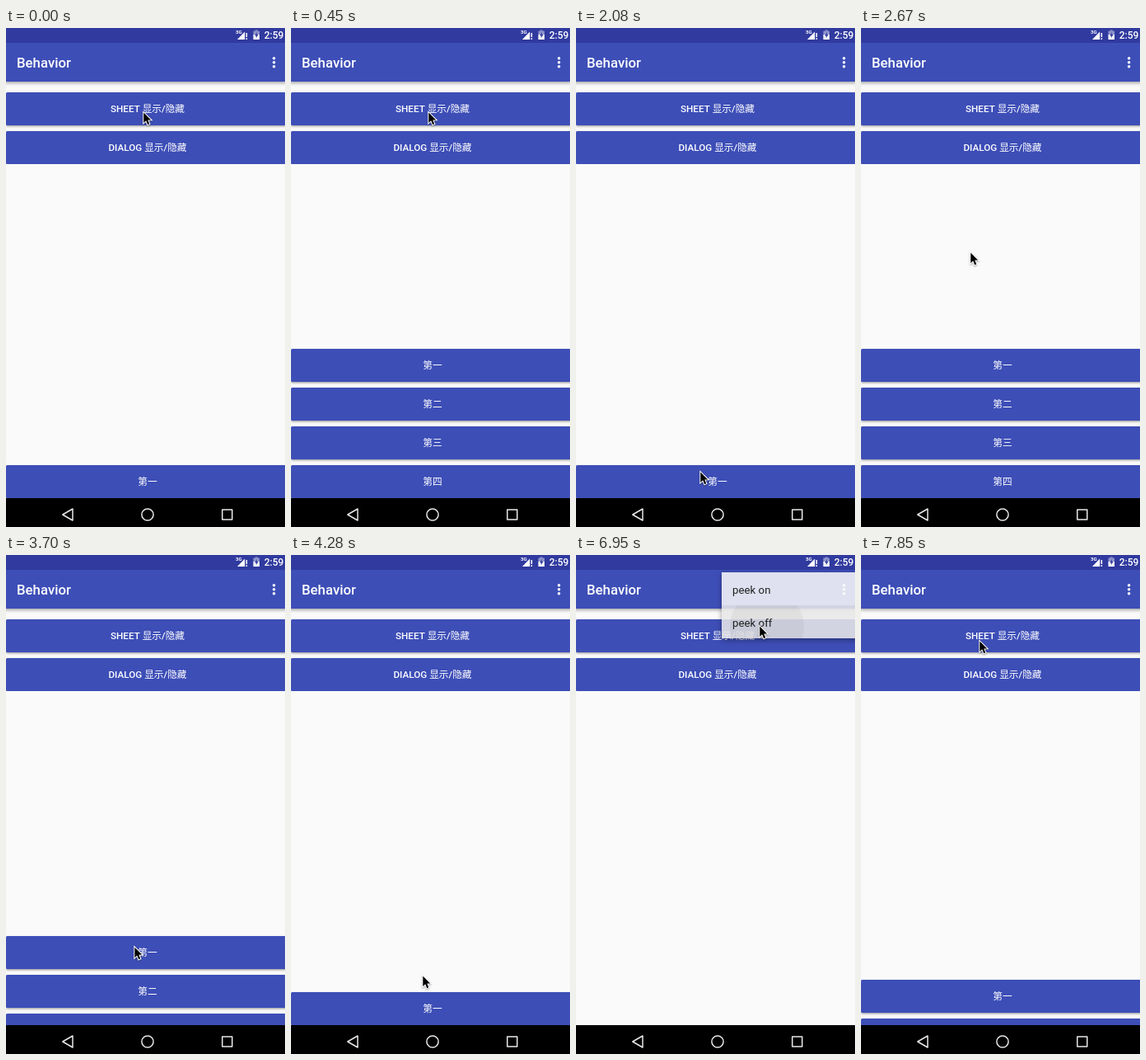
These frames come from a looping animation (339 px wide and 605 px high, 8 s). An HTML page with a canvas:

```html
<!DOCTYPE html>
<html lang="zh">
<head>
<meta charset="utf-8">
<title>Behavior</title>
<style>
  html, body { margin: 0; width: 100%; height: 100%; overflow: hidden; background: #fafafa; }
  canvas { display: block; width: 339px; height: 605px; }
</style>
</head>
<body>
<canvas id="stage"></canvas>
<script>
const W = 339, H = 605, SCREEN = 344, NAV_TOP = 570, LOOP = 8000;
const TICK = 147.5, LAST_TICK = 53;
const OPEN = 389, PEEK = 530, HIDDEN = 570;
const ROW = 47, ROW_HEIGHT = 40, LIST_TOP = 78;
const MENU = { x: 177, y: 21, w: 170, h: 80, row: 40 };
const BLUE = '#3d4eb7', DARK_BLUE = '#303a9f', PAPER = '#fafafa';
const FACE = 'Roboto, "Noto Sans CJK SC", "Noto Sans CJK", sans-serif';

// Pointer moves, in screen refreshes
const HOME = { x: 166, y: 101 };
const MOVES = [
  { from: 9, to: 14, x: 150, y: 537 },
  { from: 14, to: 15, x: 150, y: 549 },
  { from: 16, to: 18, x: 132, y: 271 },
  { from: 19, to: 27, x: 159, y: 509 },
  { from: 29, to: 35, x: 318, y: 41 },
  { from: 37, to: 40, x: 232.5, y: 46 },
  { from: 40, to: 42, x: 222, y: 88 },
  { from: 43, to: 44, x: 222, y: 85 },
  { from: 47, to: 51, x: 143, y: 103 },
];

const canvas = document.getElementById('stage');
const ctx = canvas.getContext('2d');
const dpr = window.devicePixelRatio || 1;
canvas.width = Math.round(W * dpr);
canvas.height = Math.round(H * dpr);

const clamp = (v, lo, hi) => Math.min(hi, Math.max(lo, v));

function pointerAt(tick) {
  let { x, y } = HOME;
  for (const m of MOVES) {
    const p = clamp((tick - m.from) / (m.to - m.from), 0, 1);
    const e = (1 - Math.cos(Math.PI * p)) / 2;
    x += (m.x - x) * e;
    y += (m.y - y) * e;
  }
  return { x, y };
}

function settle(elapsed, a, b) {
  const p = clamp(elapsed / 512, 0, 1);
  return a + (b - a) * (1 - (1 - p) ** 5);
}

const dragTop = tick => clamp(pointerAt(tick).y - 12, OPEN, PEEK);

function sheetTop(tick) {
  const ms = tick * TICK;
  if (tick < 7) return settle(ms - 85, PEEK, OPEN);
  if (tick < 16) return settle(ms - 1021, OPEN, PEEK);
  if (tick <= 27) return dragTop(tick);
  if (tick < 47) return settle(ms - 27 * TICK, dragTop(27), PEEK);
  return settle(ms - 7781.5, HIDDEN, OPEN);
}

function text(str, x, y, size, weight = 500, color = '#fff', align = 'left') {
  ctx.font = `${weight} ${size}px ${FACE}`;
  ctx.textAlign = align;
  ctx.fillStyle = color;
  ctx.fillText(str, x, y);
}

function shape(points) {
  ctx.beginPath();
  points.forEach(([x, y]) => ctx.lineTo(x, y));
  ctx.closePath();
}

function dot(x, y, r) {
  ctx.beginPath();
  ctx.arc(x, y, r, 0, Math.PI * 2);
}

function clipped(x, y, w, h, paint) {
  ctx.save();
  ctx.beginPath();
  ctx.rect(x, y, w, h);
  ctx.clip();
  paint();
  ctx.restore();
}

function raised(x, y, w, h, color, drop, blur, alpha) {
  ctx.save();
  ctx.shadowColor = `rgba(0,0,0,${alpha})`;
  ctx.shadowOffsetY = drop * dpr;
  ctx.shadowBlur = blur * dpr;
  ctx.fillStyle = color;
  ctx.beginPath();
  ctx.roundRect(x, y, w, h, 1.5);
  ctx.fill();
  ctx.restore();
}

function buttons(labels, top, bottom) {
  clipped(0, 0, W, bottom, () => labels.forEach((label, i) => {
    const y = top + i * ROW;
    raised(0, y, SCREEN, ROW_HEIGHT, BLUE, 1.3, 2.6, 0.38);
    text(label, SCREEN / 2, y + 24.4, 11.7, 500, '#fff', 'center');
  }));
}

function statusBar() {
  ctx.fillStyle = DARK_BLUE;
  ctx.fillRect(0, 0, W, 18);
  text('3G', 279, 7.3, 6.2, 700);
  shape([[281, 14], [290.2, 4.5], [290.2, 14]]);
  ctx.fill();
  ctx.fillRect(291.6, 6, 1.5, 5);
  ctx.fillRect(291.6, 12.2, 1.5, 1.8);
  // Battery: dim empty part above, bright charge below
  ctx.fillStyle = 'rgba(255,255,255,0.45)';
  ctx.fillRect(302.7, 2.4, 3.1, 1.2);
  ctx.fillRect(300.5, 3.6, 7.5, 4.4);
  ctx.fillStyle = '#fff';
  ctx.fillRect(300.5, 8, 7.5, 6);
  ctx.fillStyle = DARK_BLUE;
  shape([[305, 5], [302, 9.6], [304, 9.6], [303.6, 12.6], [306.6, 8], [304.6, 8]]);
  ctx.fill();
  text('2:59', 313.8, 13, 12);
}

function toolbar() {
  raised(-10, 18, SCREEN + 20, 47, BLUE, 1.6, 4, 0.38);
  text('Behavior', 13, 48, 16.8);
  ctx.fillStyle = '#fff';
  for (let i = -1; i <= 1; i++) {
    dot(325.6, 41.8 + i * 5, 1.75);
    ctx.fill();
  }
}

function navBar() {
  ctx.fillStyle = '#000';
  ctx.fillRect(0, NAV_TOP, W, H - NAV_TOP);
  ctx.strokeStyle = '#e8e8e8';
  ctx.lineWidth = 1.5;
  ctx.lineJoin = 'round';
  shape([[68.8, 590], [81, 583], [81, 597]]);
  ctx.stroke();
  dot(172, 590, 7.1);
  ctx.stroke();
  ctx.strokeRect(262.8, 584, 12, 12);
}

function ripple(x, y, w, h) {
  clipped(x, y, w, h, () => {
    ctx.fillStyle = 'rgba(0,0,0,0.07)';
    ctx.fillRect(x, y, w, h);
    dot(232, 87, 45);
    ctx.fillStyle = 'rgba(0,0,0,0.05)';
    ctx.fill();
  });
}

function menu(tick) {
  if (tick < 37 || tick > 47) return;
  const { x, y, w, h, row } = MENU;
  const leaving = tick === 47;
  ctx.save();
  ctx.globalAlpha = leaving ? 0.86 : tick === 37 ? 0.65 : 1;
  // Keep the shadow outside so the fading panel stays even
  ctx.save();
  ctx.beginPath();
  ctx.rect(0, 0, W, H);
  ctx.rect(x, y, w, h);
  ctx.clip('evenodd');
  raised(x, y, w, h, PAPER, 2.2, 6, 0.42);
  ctx.restore();
  ctx.fillStyle = PAPER;
  ctx.fillRect(x, y, w, h);
  if (leaving) {
    ripple(x, y + row, w, row);
    ctx.globalAlpha = 1;
  }
  ['peek on', 'peek off'].forEach((label, i) =>
    text(label, x + 13, y + 25.5 + i * row, 13.3, 400, '#212121'));
  ctx.restore();
}

function pointer({ x, y }) {
  ctx.save();
  ctx.translate(x, y);
  shape([[1.3, 1.6], [1.3, 14], [4.2, 11.3], [6.2, 16.2], [8.3, 15.3], [6.3, 10.6], [10.2, 10.4]]);
  ctx.shadowColor = 'rgba(0,0,0,0.35)';
  ctx.shadowOffsetY = dpr;
  ctx.shadowBlur = 2 * dpr;
  ctx.strokeStyle = '#fff';
  ctx.lineWidth = 2;
  ctx.lineJoin = 'miter';
  ctx.miterLimit = 3;
  ctx.stroke();
  ctx.shadowColor = 'transparent';
  ctx.fillStyle = '#000';
  ctx.fill();
  ctx.restore();
}

function draw(now) {
  const tick = Math.min(LAST_TICK, Math.floor((now % LOOP) / TICK));
  ctx.setTransform(dpr, 0, 0, dpr, 0, 0);
  ctx.fillStyle = PAPER;
  ctx.fillRect(0, 0, W, H);
  buttons(['SHEET 显示/隐藏', 'DIALOG 显示/隐藏'], LIST_TOP, LIST_TOP + ROW + ROW_HEIGHT);
  toolbar();
  statusBar();
  buttons(['第一', '第二', '第三', '第四'], Math.round(sheetTop(tick)), NAV_TOP);
  navBar();
  menu(tick);
  pointer(pointerAt(tick));
}

const start = performance.now();
function loop() {
  draw(performance.now() - start);
  requestAnimationFrame(loop);
}
loop();
</script>
</body>
</html>
```
